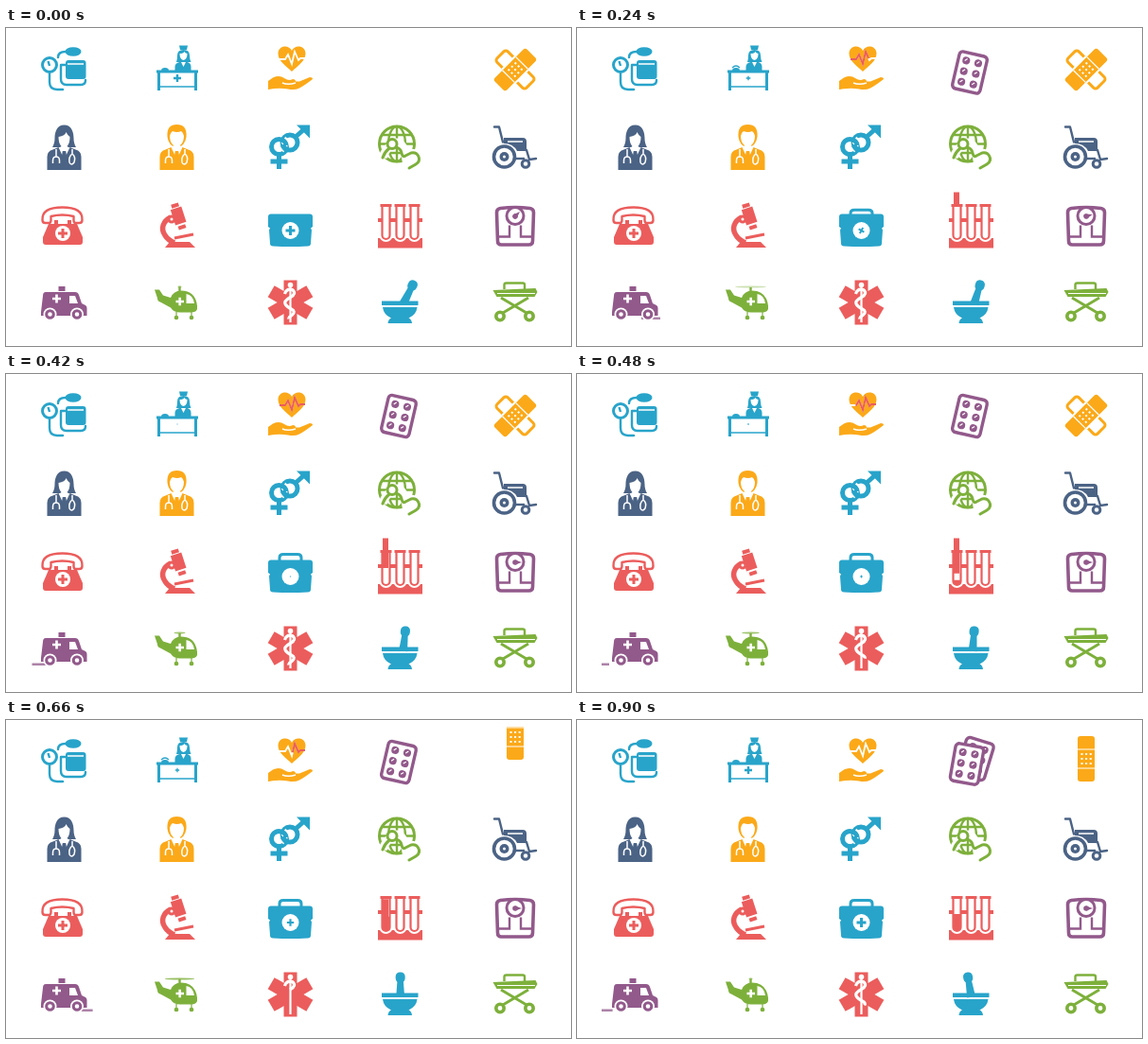
These frames come from a looping animation (597 px wide and 336 px high, 960 ms). An HTML page:

```html
<!DOCTYPE html>
<html lang="en">
<head>
<meta charset="utf-8">
<title>Medical icons</title>
<style>
html, body { margin: 0; width: 100%; height: 100%; overflow: hidden; background: #fff; }
svg { display: block; width: 597px; height: 336px; fill: currentColor; }
.blue { color: #28a4ca; } .orange { color: #fba919; } .purple { color: #92598b; }
.green { color: #7db03b; } .navy { color: #4b6385; } .red { color: #eb5d5c; }
.l { fill: none; stroke: currentColor; stroke-width: 3; }
.m { stroke-width: 2.4; }
.x { stroke-width: 5; }
.w { fill: #fff; }
.wl { fill: none; stroke: #fff; stroke-width: 2; }
.s { stroke-width: 1.5; }
.b { fill: #fff; stroke: currentColor; stroke-width: 3; }
.r { stroke-linecap: round; stroke-linejoin: round; }
</style>
</head>
<body>
<svg viewBox="0 0 597 336">
<defs>
  <clipPath id="stage"><rect x="26" y="7.5" width="537" height="306"/></clipPath>
  <clipPath id="road"><rect x="26" y="300" width="71" height="13"/></clipPath>
  <clipPath id="pour"><rect x="392" y="173.5" width="18" height="60"/></clipPath>
  <g id="pack">
    <rect class="b" style="stroke-width:3.4" x="-15" y="-20" width="30" height="40" rx="4"/>
    <path class="l r" style="stroke-width:8" d="M-6.500-11.500h.1M6.500-11.500h.1M-6.500 0h.1M6.500 0h.1M-6.500 11.500h.1M6.500 11.500h.1"/>
    <path class="wl" style="stroke-width:1.2" d="M-8-11l2.500-2.500M5-11l2.500-2.500M-8 .5l2.500-2.500M5 .5l2.500-2.500M-8 12l2.500-2.500M5 12l2.500-2.500"/>
  </g>
  <g id="plaster">
    <rect x="-9" y="-24" width="18" height="48" rx="3"/>
    <path class="wl" style="stroke-width:1.2" d="M-9-10H9M-9 10H9"/>
    <path class="wl" stroke-dasharray="2 2.600" d="M-5.500-5H6M-5.500 0H6M-5.500 5H6"/>
  </g>
  <g id="coat">
    <path d="M43.500 150v-14q0-6 6-7.500l6-2.500 6 13 6-13 6 2.500q6 1.500 6 7.500v14z"/>
    <path d="M59.800 130h3.400l1.500 9-3.200 6-3.200-6z"/>
    <path class="wl s" d="M53 128v8M49.500 143v-3q0-4 3.500-4t3.500 4v3M70 128v5q-4 3-3 9 2 4 5 0 2-6-2-9"/>
  </g>
  <g id="tube">
    <path class="wl" style="stroke-width:6" d="M-4 206v13a4 4 0 0 0 8 0v-13"/>
    <path class="b" style="stroke-width:2.2" d="M-4 187v32a4 4 0 0 0 8 0v-32"/>
    <path class="l" d="M-6 187.500H6"/>
  </g>
</defs>

<g class="blue">
  <circle class="l" cx="46" cy="39" r="7.500"/>
  <path class="l m" d="M44.500 35l1.500 5"/>
  <path class="l m r" d="M55 31q0-6 8-6M46 48v9q0 8 8 8h6M64 39h-6v15q0 6 6 6h15q5 0 5-5"/>
  <ellipse cx="71" cy="25" rx="8.500" ry="4.800"/>
  <rect x="63" y="34" width="21.500" height="20" rx="3"/>
  <path class="wl s" d="M65 38h17"/>
</g>

<g class="blue">
  <path d="M159 44.500h44v3h-44zM164 45a4 3 0 0 1 8 0zM183 18.500h9l-1 4.500h-7zM180 36q1-3 1-7 0-6 6.500-6t6.500 6q0 4 1.500 7zM178.500 45v-4q0-4 5-5h8q4 1 4 5v4z"/>
  <path class="w" d="M183.500 27q4 0 5-2 1 2 3 2 0 6-4 7-4-1-4-7zM185 36h5l-2.500 5z"/>
  <path class="l" d="M161.500 47v19M200.500 47v19"/>
  <path class="l m" style="stroke-width:1.5" d="M162 62h38"/>
  <path id="waves" class="l" style="stroke-width:1.200" d="M164 42q4-4 8 0"/>
  <path id="deskCross" class="l m" d="M-4 0H4M0-4V4"/>
</g>

<g class="orange">
  <path d="M302 46C296 40 287.500 35 287.500 27c0-9 11.500-10 14.500-3 3-7 14.500-6 14.500 3 0 8-8.500 13-14.500 19z"/>
  <path d="M277 56l5-3.500q7-3 12 .5t9 1q3 0 3 2.500h4l11-4.500q3 0 3 2-9 7-14 9.500-5 2.500-12 1-10-1.500-21 .5z"/>
  <path class="wl s" d="M292 58q6 2.500 14 0"/>
  <path class="wl" style="stroke-width:1.800" d="M289 33h6l3-5 4 10 3-13 4 9 2-2h5"/>
  <path id="pulse" class="red l" style="stroke-width:2" pathLength="100" d="M289 33h6l3-5 4 10 3-13 4 9 2-2h5"/>
</g>

<g clip-path="url(#stage)">
  <g class="purple">
    <use href="#pack" id="backPack"/>
    <use href="#pack" id="frontPack"/>
  </g>
  <g class="orange">
    <g id="crossed" transform="translate(538 44)">
      <rect class="b m" x="-8" y="-22" width="16" height="44" rx="3" transform="rotate(-45)"/>
      <rect class="w" x="-11" y="-25" width="22" height="50" transform="rotate(45)"/>
      <use href="#plaster" transform="rotate(45)"/>
    </g>
    <use href="#plaster" id="plasterDrop"/>
  </g>
</g>

<g class="navy">
  <path d="M61.500 102.500c-8 0-10 8-10 14 0 4-1 7-2.500 9.500h25c-1.500-2.500-2.500-5.500-2.500-9.500 0-6-2-14-10-14z"/>
  <path class="w" d="M55.500 115q7-1 8-5 2 4 4 5 0 7-3 10l3 2-6 12-6-12 3-2q-3-3-3-10z"/>
  <use href="#coat"/>
</g>

<g class="orange">
  <path d="M170.500 115q-1-13 10-13t10 13q-1 9-10 12-9-3-10-12z"/>
  <path class="w" d="M173 114q1-4 3-5 5 2 9 0 2 1 3 5 0 7-4 10l2 3-5.500 12-5.500-12 2-3q-4-3-4-10z"/>
  <use href="#coat" x="119"/>
</g>

<g class="blue">
  <path class="l x" d="M306 115l9-8"/>
  <path d="M307 102.500h14v14z"/>
  <circle class="l x" cx="300" cy="121" r="8"/>
  <path class="wl" style="stroke-width:8" d="M293 118a8.200 8.200 0 0 1 3 4"/>
  <circle class="l x" cx="288.500" cy="125.500" r="8"/>
  <path class="wl" style="stroke-width:8" d="M293.500 126a8 8 0 0 0 2 2"/>
  <path class="l x" d="M292.500 124a8 8 0 0 0 6 5"/>
  <path class="l x" d="M288.500 134v15M279.500 141h18"/>
</g>

<g class="green">
  <circle class="l" cx="413" cy="122.500" r="18.500"/>
  <g class="l m">
    <ellipse cx="413" cy="122.500" rx="9" ry="18.500"/>
    <path d="M413 104v38M394 122.500h38M397 113h32M397 132h32"/>
  </g>
  <path class="wl" style="stroke-width:9" d="M398 137q2-8 10-14t13 6l3 16q3 4 10-3t-1-9-12 0"/>
  <circle class="b" cx="408" cy="122.500" r="5"/>
  <path class="l r" d="M398 137q2-6 7-10M412 126q5 1 6 6t4 3l6-3q6-1 8 4t-3 8l-7 4"/>
</g>

<g class="navy">
  <path class="l m r" d="M516 104.500h5l4 16M550 129l3 10 7-1"/>
  <path d="M526 116h20q4 0 4 4v10h-10q-4-8-14-8z"/>
  <path class="wl s" d="M530 120h16"/>
  <circle class="b" style="stroke-width:3.600" cx="526.500" cy="136" r="11"/>
  <circle cx="526.500" cy="136" r="5"/>
  <circle class="w" cx="526.500" cy="136" r="1.500"/>
  <path class="l m" d="M537 138h11"/>
  <circle class="b m" cx="549" cy="143.500" r="3.800"/>
</g>

<g class="red">
  <path class="l m r" d="M38.500 203q-1-13.500 21-13.500t21 13.500q0 3-3 3h-4q-2 0-2-3v-4q-12-3-24 0v4q0 3-2 3h-4q-3 0-3-3z"/>
  <path d="M51 203h4v4h10v-4h4v4h6l6 14v5q0 3-3 3H42q-3 0-3-3v-5l6-14h6z"/>
  <circle class="w" cx="60" cy="217" r="8"/>
  <path class="l" d="M55 217h10M60 212v10"/>
</g>

<g class="red">
  <g transform="rotate(-18 182 198)">
    <path d="M178 185h8v4h-8zM176 190h12v17h-12zM178 209h8v4h-8z"/>
  </g>
  <path class="l" style="stroke-width:5.500" d="M174 200c-8 4-11 12-6 19q3 5 10 8"/>
  <circle class="b m" cx="175" cy="202" r="3"/>
  <path class="l" d="M178 222l20-4"/>
  <path d="M168 232l5-6h21l6 6z"/>
</g>

<g class="blue">
  <path id="handle" class="l" d="M289 203v-9q0-3.500 4-3.500h15q4 0 4 3.500v9"/>
  <path d="M280 196.500h41q3 0 3 3V210l-2 1.500 1 2-1 14q0 3-3 3-18.500 1-37 0-3 0-3-3l-1-14 1-2-2-1.500v-10.500q0-3 3-3z"/>
  <circle class="w" cx="300.500" cy="214" r="9"/>
  <path id="bagCross" class="l" d="M-5 0H5M0-5V5"/>
</g>

<g class="red">
  <path d="M393 201h47v4h-47zM393 222h47v10.500h-47z"/>
  <use href="#tube" x="401.500"/><use href="#tube" x="416.500"/><use href="#tube" x="431.500"/>
  <g clip-path="url(#pour)">
    <path id="liquid" class="l" style="stroke-width:7"/>
    <path id="stream" class="l" style="stroke-width:6"/>
  </g>
</g>

<g class="purple">
  <path class="l" style="stroke-width:3.600" d="M518.500 195q0-4 4-4.500 15.500-2 31 0 4 .5 4 4.500l-1 30q0 4-4 4h-29q-4 0-4-4z"/>
  <path class="l m" d="M521 220.500h11v-12M555 220.500h-11v-12"/>
  <circle class="b" cx="538" cy="198.500" r="9"/>
  <g id="needle"><path d="M-2.500 0L0-7 2.500 0z"/><circle r="2.800"/></g>
</g>

<g class="purple">
  <g clip-path="url(#road)"><rect id="streak" y="305.500" width="20" height="2.500" opacity=".75"/></g>
  <path d="M42 279h31q3 0 4 3l3 9 4 2q1.500 1 1.500 3v8H37v-4l2-17q0-4 3-4zM55.500 273h7v5h-7z"/>
  <path class="w" d="M67 283h6l3 8h-9z"/>
  <path class="wl" style="stroke-width:2.600" d="M49 286h9M53.500 281.500v9"/>
  <g class="w"><circle cx="46.500" cy="302.500" r="7"/><circle cx="75" cy="302.500" r="7"/></g>
  <circle class="b" cx="46.500" cy="302.500" r="3.800"/><circle class="b" cx="75" cy="302.500" r="3.800"/>
</g>

<g class="green">
  <path d="M174 285q3-7.500 11-7.500 15 0 17 16 1 7-6 7h-12q-7 0-10-5l-11-6q-3-1-3-4l-3-9h5l4 6z"/>
  <path class="l m" d="M183.500 274v5"/>
  <path class="w" d="M190.500 281q7 1 8.500 10h-8.500z"/>
  <path class="wl" style="stroke-width:2.600" d="M179.500 289h8.500M183.700 284.800v8.500"/>
  <path class="l" style="stroke-width:1.200" d="M180 300v5M196 300v5"/>
  <circle cx="180" cy="306" r="2.300"/><circle cx="196" cy="306" r="2.300"/>
  <ellipse id="rotor" cx="183.500" cy="273.500" ry="1"/>
</g>

<g class="red">
  <g class="l" style="stroke-width:14">
    <path d="M300.500 266.500v47"/>
    <path d="M300.500 266.500v47" transform="rotate(60 300.500 290)"/>
    <path d="M300.500 266.500v47" transform="rotate(120 300.500 290)"/>
  </g>
  <path class="wl" style="stroke-width:2.200" d="M300.500 271v40"/>
  <circle class="w" cx="300.500" cy="271.500" r="2.800"/>
  <path id="snake" class="wl" style="stroke-width:3.200" pathLength="100" d="M294.500 281q2-6 8-4.500 5 4-2 8t-5.500 7 6.500 5.500 1 6-5 3"/>
</g>

<g class="blue">
  <g id="pestle"><path d="M-3 2h6l1.500 20h-9z"/><rect x="-5" y="-4.500" width="10" height="11" rx="4.500"/></g>
  <path d="M397 288.500h38.500v4.500H397zM398 295h36.500q-1 8-9 11.500 3 1 3.500 5.500h-25.500q.5-4.500 3.500-5.500-8-3.500-9-11.500z"/>
</g>

<g class="green">
  <path class="l m" d="M526.500 276v-4.500q0-2 2-2h17.500q2 0 2 2v4.500"/>
  <path class="l" d="M523 285l27 16M552 285l-27 16"/>
  <path d="M514.500 277l45-2 2 4-3 5h-40z"/>
  <path class="wl" style="stroke-width:1" d="M519 280.500h40"/>
  <circle class="b" style="stroke-width:3.600" cx="522" cy="304.500" r="4.200"/><circle class="b" style="stroke-width:3.600" cx="553" cy="304.500" r="4.200"/>
</g>
</svg>

<script>
const LOOP = 960, STEP = 60;
const el = id => document.getElementById(id);
const set = (id, name, value) => el(id).setAttribute(name, value);
const show = (id, on) => set(id, 'visibility', on ? 'visible' : 'hidden');

// Linear track: time, value, time, value, ...
function track(t, ...keys) {
  for (let i = 0; i < keys.length - 2; i += 2) {
    const [t0, v0, t1, v1] = keys.slice(i, i + 4);
    if (t <= t0) return v0;
    if (t < t1) return v0 + (v1 - v0) * (t - t0) / (t1 - t0);
  }
  return keys[keys.length - 1];
}

function place(id, x, y, angle = 0, scale = 1) {
  set(id, 'transform', `translate(${x} ${y}) rotate(${angle}) scale(${scale})`);
}

function reveal(id, from, to) {
  set(id, 'stroke-dasharray', `0 ${from} ${to - from} 200`);
  show(id, to - from > 0.5);
}

function draw(t) {
  place('deskCross', 181, 53, 0, track(t, 0, 1, 120, .75, 300, .5, 420, .15, 600, .45, 780, .7, 900, 1));
  show('waves', t >= 60 && t < 360 || t >= 540 && t < 840);
  reveal('pulse', track(t, 420, 0, 600, 30, 780, 88, 840, 100), track(t, 60, 0, 120, 8, 270, 100));

  const second = track(t, 780, 0, 900, 1);
  show('frontPack', t >= 60);
  place('frontPack', 415 - 3 * second, track(t, 60, -14, 120, 14, 180, 40, 240, 47, 300, 44.5) + 2 * second, 13 - 3 * second);
  show('backPack', second > 0);
  place('backPack', 415 + 6 * second, 44 - 3 * second, 13 + 4 * second);

  show('crossed', t < 540);
  show('plasterDrop', t >= 600);
  place('plasterDrop', 538, track(t, 600, -6, 720, 42, 780, 46.5, 900, 41));

  place('handle', 0, track(t, 0, 10, 120, 3, 300, 1, 420, 0));
  place('bagCross', 300.5, 214, track(t, 120, 0, 300, 45, 420, 90),
    track(t, 120, 1, 300, .5, 420, .15, 600, .6, 780, 1));

  const streamTop = track(t, 600, 173, 780, 222);
  const streamEnd = track(t, 60, 173, 120, 176, 300, 194, 420, 205, 600, 222);
  set('stream', 'd', `M401 ${streamTop}V${streamEnd}`);
  set('liquid', 'd', `M401.5 ${track(t, 420, 222, 600, 209, 780, 205)}V222`);

  place('needle', 538, 199, track(t, 0, 45, 120, 50, 300, 85, 420, 90));

  const drive = t - 120;
  show('streak', drive >= 0);
  set('streak', 'x', 95 - .225 * (drive % 436));

  set('rotor', 'rx', track(t, 0, 2, 120, 15, 300, 17, 420, 6, 600, 16, 780, 15, 900, 2));
  set('rotor', 'opacity', track(t, 0, .8, 120, .35, 300, .4, 420, .7, 600, .8));

  reveal('snake', 0, track(t, 420, 100, 600, 50, 720, 30, 900, 85));

  const top = track(t, 0, 430, 120, 428, 300, 425, 420, 422, 600, 415, 780, 420, 900, 413);
  const foot = track(t, 0, 421, 420, 420, 600, 415, 780, 420, 900, 416);
  place('pestle', top, 271, Math.atan2(top - foot, 18) * 180 / Math.PI);
}

function tick() {
  draw(Math.floor(performance.now() % LOOP / STEP) * STEP);
  requestAnimationFrame(tick);
}
tick();
</script>
</body>
</html>
```
